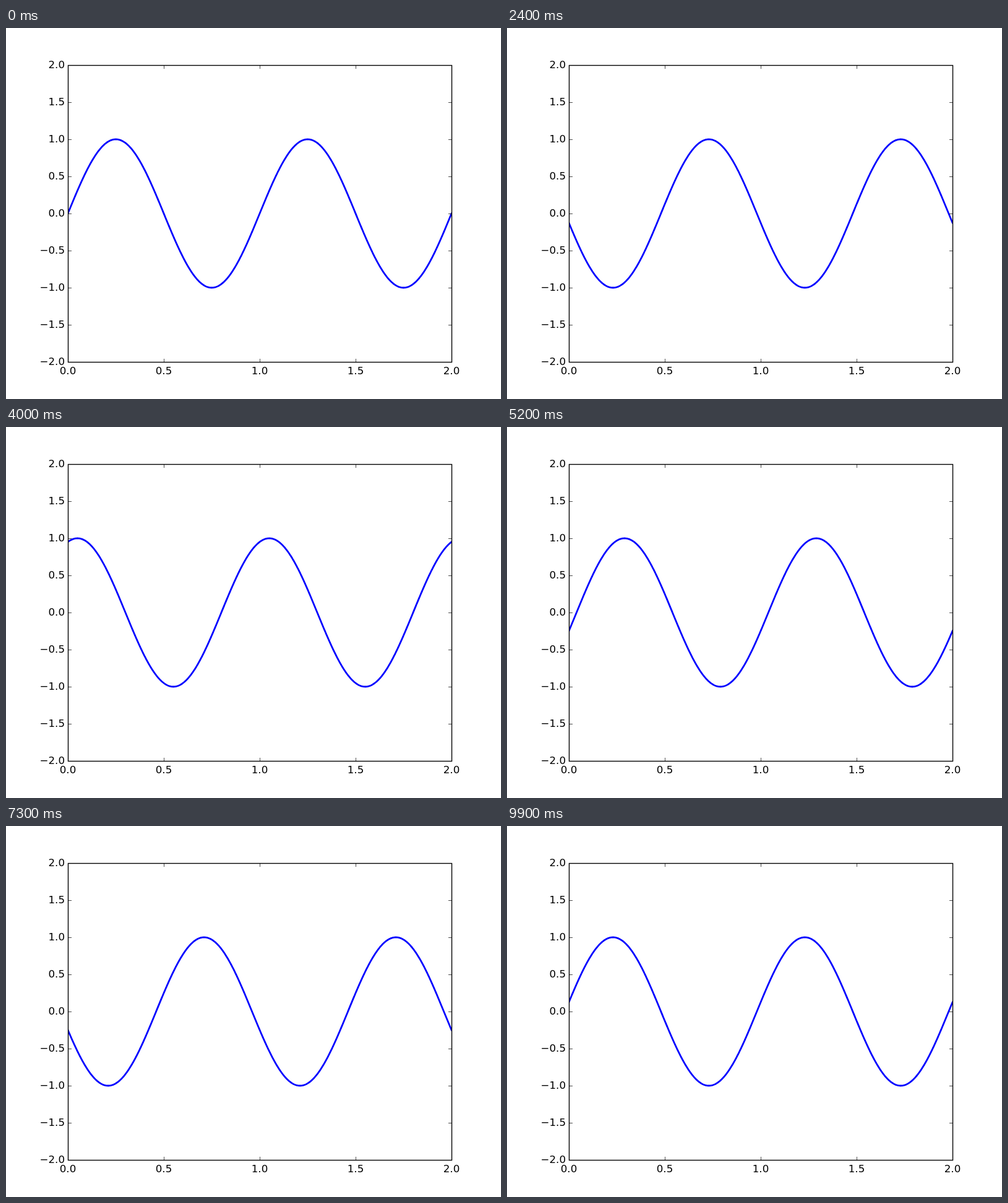
Recreate the animation shown at these times as an HTML page with a canvas. Size 800x600 px, loop 10 s.

```html
<!DOCTYPE html>
<html lang="en">
<head>
<meta charset="utf-8">
<title>Travelling sine wave</title>
<style>
html, body { margin: 0; width: 100%; height: 100%; overflow: hidden; background: #fff; }
canvas { display: block; }
</style>
</head>
<body>
<canvas id="stage" width="800" height="600"></canvas>
<script>
const ctx = document.getElementById("stage").getContext("2d");
const LEFT = 100, TOP = 60, WIDTH = 620, HEIGHT = 480;
const RIGHT = LEFT + WIDTH, BOTTOM = TOP + HEIGHT;
const PT = 100 / 72;
const STEP_MS = 100, STEPS = 100, SHIFT = 0.02, POINTS = 1000;

const toX = x => LEFT + x * WIDTH / 2;
const toY = y => TOP + (2 - y) * HEIGHT / 4;

function line(x1, y1, x2, y2) {
  ctx.beginPath();
  ctx.moveTo(x1, y1);
  ctx.lineTo(x2, y2);
  ctx.stroke();
}

function drawWave(shift) {
  ctx.save();
  ctx.beginPath();
  ctx.rect(LEFT, TOP, WIDTH, HEIGHT);
  ctx.clip();
  ctx.strokeStyle = "#00f";
  ctx.lineWidth = 2 * PT;
  ctx.lineJoin = "round";
  ctx.lineCap = "square";
  ctx.beginPath();
  for (let i = 0; i < POINTS; i++) {
    const x = 2 * i / (POINTS - 1);
    ctx.lineTo(toX(x), toY(Math.sin(2 * Math.PI * (x - shift))));
  }
  ctx.stroke();
  ctx.restore();
}

function drawAxes() {
  const l = LEFT + 0.5, r = RIGHT + 0.5, t = TOP + 0.5, b = BOTTOM + 0.5;
  const tick = 4 * PT;
  ctx.strokeStyle = ctx.fillStyle = "#000";
  ctx.font = `${12 * PT}px "DejaVu Sans", sans-serif`;
  ctx.textBaseline = "alphabetic";
  ctx.lineWidth = 0.5 * PT;

  ctx.textAlign = "center";
  for (let v = 0; v <= 2; v += 0.5) {
    const x = toX(v) + 0.5;
    line(x, t, x, t + tick);
    line(x, b, x, b - tick);
    ctx.fillText(v.toFixed(1), toX(v), 560);
  }

  ctx.textAlign = "right";
  for (let v = -2; v <= 2; v += 0.5) {
    const y = toY(v) + 0.5;
    line(l, y, l + tick, y);
    line(r, y, r - tick, y);
    ctx.fillText(v.toFixed(1).replace("-", "\u2212"), 95, toY(v) + 5);
  }

  ctx.lineWidth = PT;
  ctx.strokeRect(l, t, WIDTH, HEIGHT);
}

function draw(now) {
  const step = Math.floor(now / STEP_MS) % STEPS;
  ctx.fillStyle = "#fff";
  ctx.fillRect(0, 0, 800, 600);
  drawWave(step * SHIFT);
  drawAxes();
}

const start = performance.now();
function tickFrame() {
  draw(performance.now() - start);
  requestAnimationFrame(tickFrame);
}
tickFrame();
</script>
</body>
</html>
```
